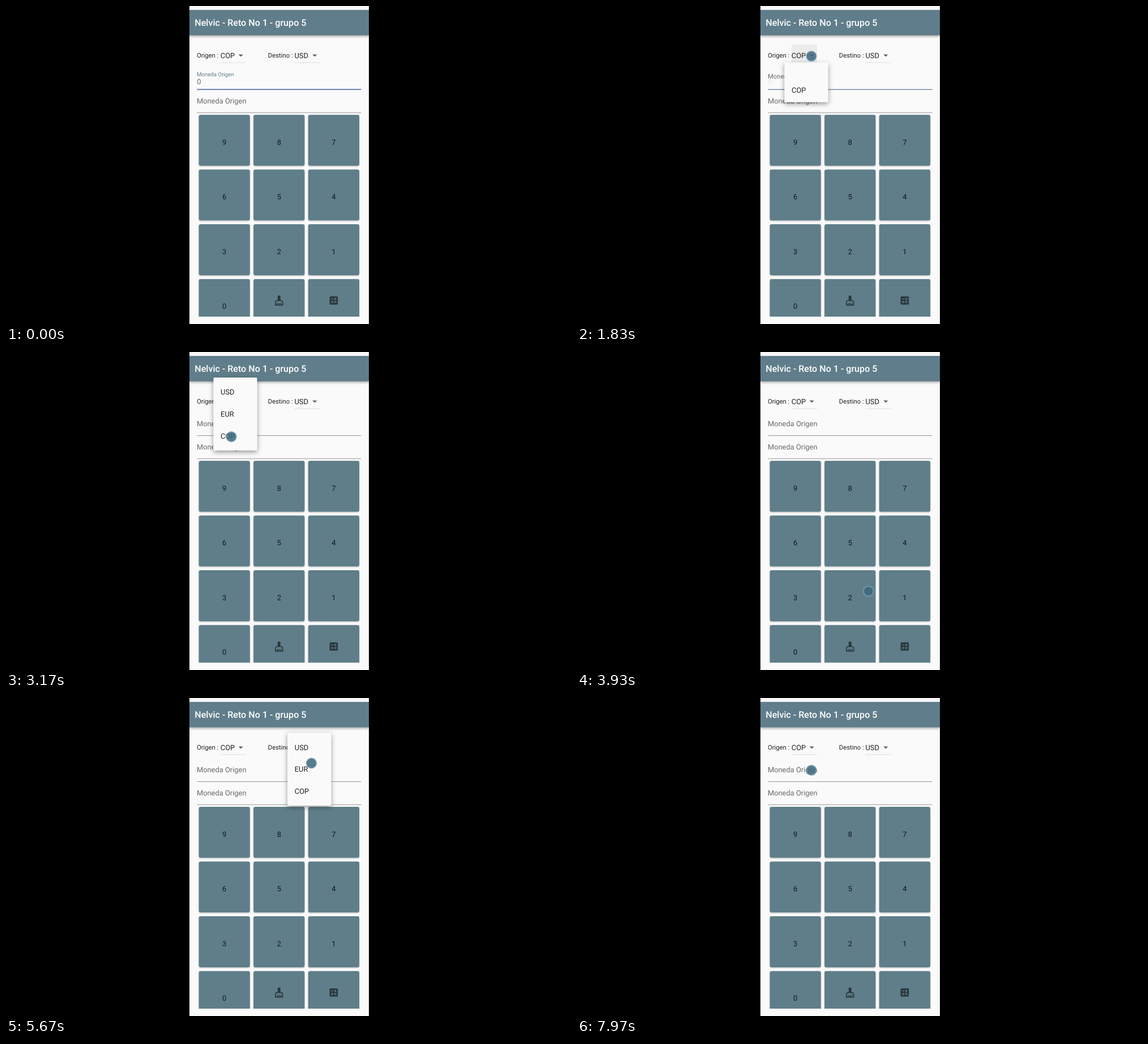
An HTML page for the animation above (8 s loop, 998 by 561 pixels).

```html
<!DOCTYPE html>
<html lang="es">
<head>
<meta charset="utf-8">
<title>Conversor</title>
<style>
  html, body { margin: 0; width: 100%; height: 100%; overflow: hidden; background: #000; }
  svg { display: block; width: 100vw; height: 100vh; }
  text { font: 12.9px Roboto, sans-serif; fill: #212121; text-rendering: geometricPrecision; }
  .title { font-size: 16.1px; font-weight: 500; fill: #fff; }
  .small { font-size: 11.3px; }
  .hint { fill: #6a6a6a; }
  .key { text-anchor: middle; fill: #10181b; }
</style>
</head>
<body>
<svg id="stage" viewBox="0 0 998 561">
  <defs>
    <clipPath id="screen"><rect x="324" width="317" height="561"/></clipPath>
    <clipPath id="grid"><rect x="324" y="188.5" width="317" height="359.5"/></clipPath>
    <filter id="barShadow" x="-5%" y="-20%" width="110%" height="160%">
      <feDropShadow dx="0" dy="2" stdDeviation="2" flood-opacity=".35"/>
    </filter>
    <filter id="keyShadow" x="-10%" y="-10%" width="120%" height="120%">
      <feDropShadow dx="0" dy="1" stdDeviation=".8" flood-opacity=".3"/>
    </filter>
    <filter id="menuShadow" x="-30%" y="-30%" width="160%" height="160%">
      <feDropShadow dx="0" dy="3" stdDeviation="4" flood-opacity=".42"/>
    </filter>
  </defs>
  <rect width="998" height="561"/>
  <g id="app" clip-path="url(#screen)"></g>
</svg>
<script>
const NS = 'http://www.w3.org/2000/svg';
const LOOP = 8000;
const ITEM = 38.6, PAD = 6.4, MENU_W = 77;
const app = document.getElementById('app');

const set = (node, attrs) => {
  for (const k in attrs) node.setAttribute(k, attrs[k]);
  return node;
};
const add = (parent, tag, attrs, text) => {
  const node = set(document.createElementNS(NS, tag), attrs);
  if (text !== undefined) node.textContent = text;
  return parent.appendChild(node);
};
const clamp = v => Math.min(1, Math.max(0, v));
const ramp = (t, from, to) => clamp((t - from) / (to - from));
const mix = (a, b, k) => a + (b - a) * k;
const smooth = k => k * k * (3 - 2 * k);
const label = (x, y, text, cls = '') => add(app, 'text', { x, y, class: cls }, text);
const rule = (x, y, w, h, fill) => add(app, 'rect', { x, y, width: w, height: h, fill });

// App bar
rule(324, 0, 317, 561, '#fafafa');
set(rule(324, 6.7, 317, 45, '#607d8b'), { filter: 'url(#barShadow)' });
rule(324, 0, 317, 6.7, '#f7f7f7');
label(333.3, 35.2, 'Nelvic - Reto No 1 - grupo 5', 'title');

// Currency selectors
const selector = (x, code) => {
  const glow = rule(x, 68, 45, 32, '#ececec');
  label(x - .2, 91.6, code);
  add(app, 'path', { d: `M${x + 31.6} 85.4h8.2l-4.1 4.2z`, fill: '#616161' });
  rule(x, 99.5, 45, .9, '#d9d9d9');
  return glow;
};
label(336.9, 91.2, 'Origen :', 'small');
label(462.8, 91.2, 'Destino :', 'small');
const glows = [selector(379, 'COP'), selector(509.6, 'USD')];

// Amount fields
const floating = label(0, 0, 'Moneda Origen');
const zero = label(337.2, 137.7, '0', 'hint');
rule(337.4, 147.1, 290, .9, '#8c8c8c');
const focusLine = rule(337.4, 146.4, 290, 1.7, '#5a70a8');
label(336.9, 171.9, 'Moneda Origen', 'hint');
rule(337.4, 187.7, 290, .9, '#8c8c8c');

// Keypad
const icons = {
  clear: 'M16 11h-1V3c0-1.1-.9-2-2-2h-2C9.9 1 9 1.9 9 3v8H8c-2.76 0-5 2.24-5 5v7h18v-7c0-2.76-2.24-5-5-5z' +
    'M19 21h-2v-3a1 1 0 0 0-2 0v3h-2v-3a1 1 0 0 0-2 0v3H9v-3a1 1 0 0 0-2 0v3H5v-5c0-1.65 1.35-3 3-3h8c1.65 0 3 1.35 3 3z',
  calc: 'M5 3h14q2 0 2 2v14q0 2-2 2H5q-2 0-2-2V5q0-2 2-2z' +
    'M13 7l1.1-1 1.4 1.4L16.9 6 18 7l-1.4 1.4L18 9.9l-1.1 1-1.4-1.4-1.4 1.4-1.1-1 1.4-1.5z' +
    'M6.2 7.7h5v1.5h-5zM6 14.5h2v-2h1.5v2h2V16h-2v2H8v-2H6zM13 13.2h5v1.5h-5zM13 15.7h5v1.5h-5z'
};
const pad = add(app, 'g', { 'clip-path': 'url(#grid)' });
['9', '8', '7', '6', '5', '4', '3', '2', '1', '0', 'clear', 'calc'].forEach((name, i) => {
  const x = 340.6 + 96.6 * (i % 3), y = 191.9 + 96.6 * Math.floor(i / 3);
  add(pad, 'rect', { x, y, width: 90.2, height: 89.8, rx: 3.2, fill: '#5f7e89', filter: 'url(#keyShadow)' });
  if (icons[name]) {
    add(pad, 'path', {
      d: icons[name], fill: '#000', 'fill-opacity': .56, 'fill-rule': 'evenodd',
      transform: `translate(${x + 35.4} ${y + 28.2}) scale(.806)`
    });
  } else {
    add(pad, 'text', { x: x + 45.1, y: y + 52.7, class: 'key' }, name);
  }
});

// Drop-down menus: unfold from the selected row, then fade the others in
const menu = (x, y, selected, opens, closes) => {
  const g = add(app, 'g', {});
  const box = add(g, 'rect', { x, width: MENU_W, rx: 1.6, fill: '#fafafa', filter: 'url(#menuShadow)' });
  const rows = ['USD', 'EUR', 'COP'].map((code, i) =>
    add(g, 'text', { x: x + 12.6, y: y + PAD + ITEM * (i + .5) + 4.6 }, code));
  const first = PAD + ITEM * selected, full = 3 * ITEM + 2 * PAD;
  return t => {
    const k = ramp(t, opens, opens + 300);
    const size = ramp(k, .25, .5);
    const top = mix(first, 0, size), bottom = mix(first + ITEM, full, size);
    set(g, { opacity: ramp(k, 0, .25) * (1 - ramp(t, closes, closes + 75)) });
    set(box, { y: y + top, height: bottom - top });
    rows.forEach((row, i) => {
      const start = .5 + (i + 1) / 9;
      set(row, { opacity: i === selected ? 1 : ramp(k, start, start + 1 / 6) });
    });
  };
};
const menus = [menu(366.5, 45, 2, 1730, 3390), menu(497.2, 61.2, 0, 5130, 6930)];

// Pointer: time, x, y
const path = [
  [700, 654, 330], [1000, 545, 210], [1420, 414, 88.5], [2420, 414, 88.5],
  [2640, 437, 100], [2860, 410, 52], [3120, 398, 149.5], [3440, 398, 149.5],
  [3850, 500, 462], [4100, 560, 300], [4450, 547, 88.5], [5480, 547, 88.5],
  [5670, 539.5, 115], [5980, 552, 192], [6250, 568, 165], [6620, 529.5, 89],
  [6960, 529.5, 89], [7240, 450, 310], [7520, 358, 470], [7880, 414, 127.5]
];
const pointer = add(app, 'g', {});
add(pointer, 'circle', { r: 8.8, fill: '#3f687c', 'fill-opacity': .87, stroke: '#76a3bb', 'stroke-width': 1.4 });

const pointerAt = t => {
  const i = path.findIndex(p => p[0] > t);
  if (i < 0) return path[path.length - 1].slice(1);
  if (i === 0) return path[0].slice(1);
  const [t0, x0, y0] = path[i - 1], [t1, x1, y1] = path[i];
  const k = smooth(ramp(t, t0, t1));
  return [mix(x0, x1, k), mix(y0, y1, k)];
};

function draw(t) {
  const blur = ramp(t, 1730, 1930), drop = smooth(blur);
  floating.style.fontSize = mix(9.7, 12.9, drop) + 'px';
  floating.style.fill = blur < .2 ? '#607d8b' : '#6a6a6a';
  set(floating, { x: 336.9, y: mix(124.4, 131, drop) });
  set(zero, { opacity: Math.pow(1 - blur, 3) });
  set(focusLine, { opacity: 1 - blur });

  [1640, 5040].forEach((press, i) =>
    set(glows[i], { opacity: ramp(t, press, press + 60) * (1 - ramp(t, press + 350, press + 500)) }));
  menus.forEach(update => update(t));
  set(pointer, { transform: `translate(${pointerAt(t).join(' ')})` });
}

const start = performance.now();
const tick = () => {
  draw((performance.now() - start) % LOOP);
  requestAnimationFrame(tick);
};
draw(0);
requestAnimationFrame(tick);
</script>
</body>
</html>
```
